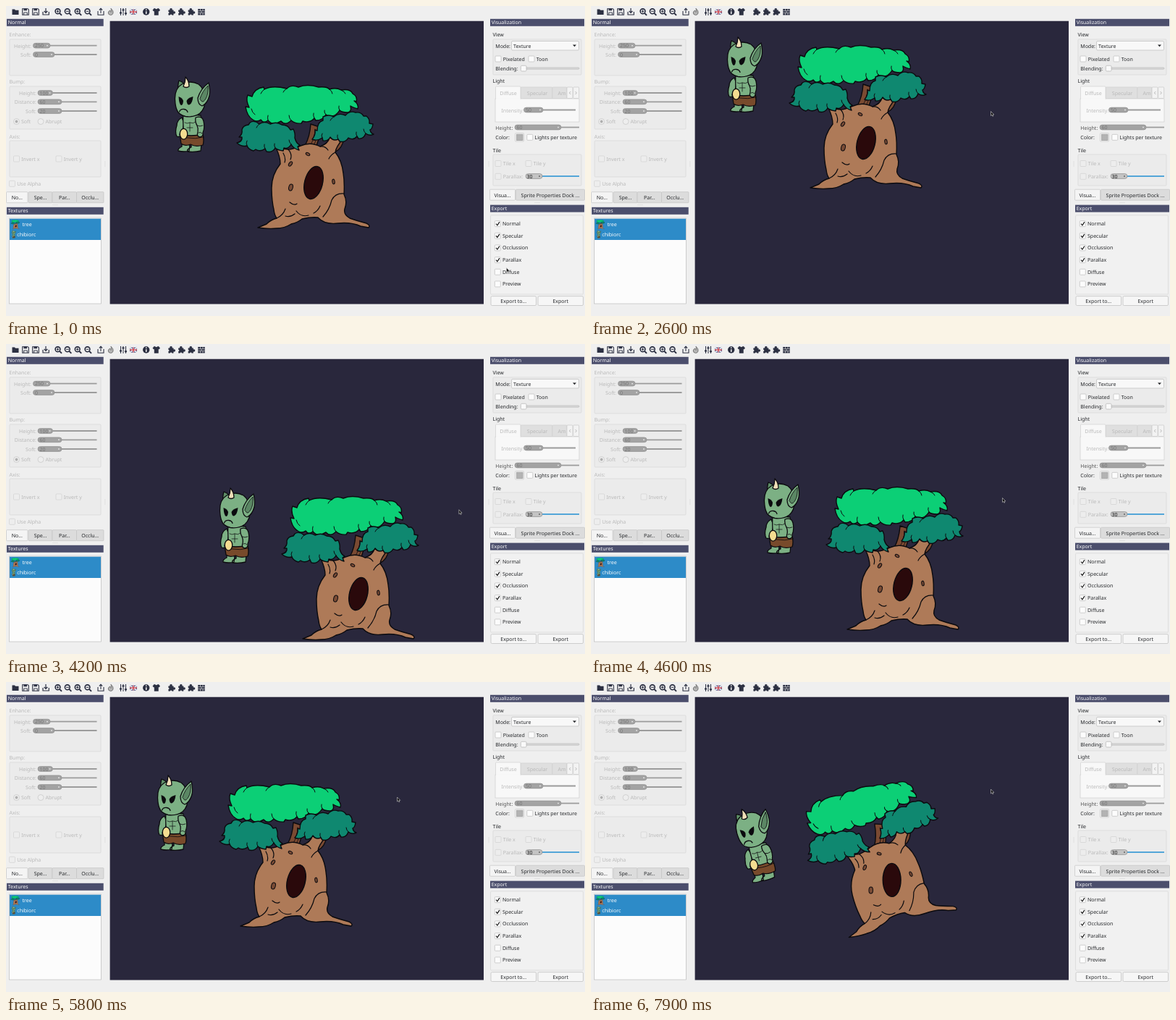
Write an HTML page that moves like this. It is 800 px wide and 428 px high and loops after 8 s.

```html
<!DOCTYPE html>
<html lang="en">
<head>
<meta charset="utf-8">
<title>Sprite lighting editor</title>
<style>
html, body { margin: 0; width: 100%; height: 100%; overflow: hidden; background: #efefef; }
svg { display: block; width: 100vw; height: 100vh; }
text { font: 7px "Noto Sans", sans-serif; text-rendering: geometricPrecision; white-space: pre; }
</style>
</head>
<body>
<svg id="stage" viewBox="0 0 800 428">
  <defs>
    <clipPath id="view"><rect x="143.6" y="20.7" width="516.4" height="390.7"/></clipPath>
    <g id="tree" stroke="#0b0a0e" stroke-width="1.4" stroke-linejoin="round" stroke-linecap="round">
      <path fill="#7a4a32" d="M421 163Q420 180 413 193L428 196Q433 182 436 168ZM449 194Q458 190 460 183L467 182Q465 197 454 202Z"/>
      <path fill="none" stroke-width=".8" d="M427 170Q427 182 420 193M432 172Q430 184 425 192"/>
      <path fill="#ae7a58" d="M373 196Q379 208 379 218Q367 233 367 251Q367 268 370 281Q371 289 374 293Q366 295 360 301L348 306Q363 308 373 307Q385 307 394 301Q403 299 409 294Q421 291 431 292Q440 302 458 300Q477 298 490 304L501 306Q504 303 498 300Q483 296 475 293Q466 288 468 280Q472 270 467 260Q468 243 466 231Q464 213 455 202Q456 194 466 183L447 182Q445 190 434 194Q421 187 407 193Q396 198 390 198Z"/>
      <path fill="none" stroke-width="1.2" d="M390 198Q396 205 393 212M383 203Q387 210 385 216M434 194Q441 193 445 199M455 202Q449 205 446 211M467 259Q455 258 450 268Q447 281 438 291M374 293Q383 289 386 280M386 290Q393 292 399 287M401 283Q408 292 418 289M392 271Q398 276 402 273M434 276Q431 283 425 286"/>
      <ellipse cx="425" cy="244" rx="12.4" ry="23" fill="#2a090b" transform="rotate(14 425 244)"/>
      <g fill="#794b35" stroke-width="1">
        <ellipse cx="393.5" cy="250.5" rx="2.8" ry="4.6" transform="rotate(15 393.5 250.5)"/>
        <ellipse cx="393" cy="218" rx="2" ry="3.6" transform="rotate(35 393 218)"/>
        <ellipse cx="417" cy="204.5" rx="3" ry="1.8" transform="rotate(30 417 204.5)"/>
        <ellipse cx="452.5" cy="242.5" rx="1.7" ry="3.4" transform="rotate(-8 452.5 242.5)"/>
      </g>
      <path fill="#0ccf76" d="M341 157Q333 152 331 139L336 140Q331 130 334 123L340 125Q343 114 356 112L357 115Q368 109 388 114Q394 108 404 112Q416 107 432 112Q444 111 447 115Q456 112 463 116Q476 114 479 121Q486 125 484 132L481 131Q488 136 486 142Q479 140 476 138Q478 146 472 147Q464 147 461 144Q456 152 449 152Q444 152 442 150Q438 158 428 158L426 155Q420 162 410 159L408 162Q400 163 394 158Q386 166 380 159L374 162Q367 164 362 158Q356 163 352 157Q347 161 341 157Z"/>
      <path fill="none" stroke-width="1" d="M344 150Q340 147 339 142M362 158Q361 154 362 151M394 158Q391 155 391 151M426 155Q424 151 425 148M442 150Q439 147 440 144M461 144Q459 141 460 138M357 115Q353 118 352 121M388 114Q384 116 383 119M447 115Q451 118 451 121M463 116Q468 118 469 121"/>
      <path fill="#0f8870" d="M319 189Q327 187 326 181L322 181Q327 177 326 171Q327 165 335 164L337 161Q343 157 350 163Q357 158 365 163Q374 159 381 164Q390 164 393 171L397 170Q400 176 399 182Q401 190 406 192L403 194L405 199Q397 197 394 191Q390 198 384 196L383 200Q375 199 372 196Q368 203 360 201L358 197Q351 202 345 198L342 200Q335 198 333 193Q326 195 319 189Z"/>
      <path fill="#0f8870" d="M423 184Q428 178 427 171L430 172Q430 160 438 158L438 153Q446 149 453 153Q460 147 469 151Q475 144 483 147Q491 146 494 152L498 152Q503 156 502 162L507 163Q506 170 503 171Q504 176 508 177Q502 180 497 176Q494 184 487 183L485 180Q480 186 473 182Q469 189 461 187L459 184Q452 187 448 181Q445 187 438 186L437 182Q430 187 423 184Z"/>
      <path fill="none" stroke-width="1" d="M333 193Q331 189 333 186M358 197Q356 194 357 191M372 196Q370 193 371 190M394 191Q391 188 391 185M350 163Q347 165 346 168M437 182Q435 179 437 176M459 184Q457 181 458 178M485 180Q483 177 484 174M497 176Q494 173 494 170M453 153Q449 155 448 158"/>
    </g>
    <g id="orc" stroke="#0b0a0e" stroke-width="1.3" stroke-linejoin="round" stroke-linecap="round">
      <path fill="#5f8f68" d="M238 118Q237 109 239 103Q245 105 248 110Z"/>
      <path fill="#7cb084" d="M243 189L243 194Q237 197 238 200Q246 202 253 200L254 192ZM256 191L256 195Q249 198 251 201Q261 202 269 200L270 190Z"/>
      <path fill="#7cb084" d="M243 154Q236 158 236 165Q233 174 236 180Q241 182 243 176L246 162Z"/>
      <path fill="#7cb084" d="M245 149Q244 163 246 179L269 180Q272 165 269 151Z"/>
      <path fill="none" stroke-width=".7" d="M247 161Q250 163 254 161Q259 163 262 160M254 161V173M250 168H258"/>
      <path fill="#784a2b" d="M240 177Q255 181 272 177Q274 186 272 192Q262 195 255 191Q247 194 242 190Z"/>
      <path fill="none" stroke-width=".8" d="M250 182Q262 184 273 181"/>
      <ellipse cx="245.5" cy="176.7" rx="5.2" ry="7.4" fill="#f4dc90"/>
      <path fill="#7cb084" d="M262 154Q271 151 273 159Q275 168 272 175Q273 180 268 181Q263 180 265 174Q266 169 264 165Q261 160 262 154Z"/>
      <path fill="none" stroke-width=".8" d="M264 165Q268 167 272 165M266 175Q268 173 271 176"/>
      <path fill="#7cb084" d="M233.5 129Q233 114 243 108Q255 102 266 108Q274 114 275 127Q276 141 268 148Q260 154 248 152.5Q238 150 236 143Q234 139 233.5 129Z"/>
      <path fill="#7cb084" d="M265 127Q269 114 280 106Q282.500 116 281 124Q278 135 271 138Q265 136 265 127Z"/>
      <path fill="#5b8764" stroke-width=".8" d="M268 128Q271 118 279 110Q280 121 276 128Q273 133 271 132Z"/>
      <path fill="#f0dfb8" d="M245 111Q248 105 248 98Q253 103 253 111Q249 114 245 111Z"/>
      <g fill="#0b0a0e" stroke="none">
        <path d="M238.500 125Q244 127 245 131Q244.500 137 242 137Q239 135.500 238.500 125Z"/>
        <path d="M258.500 125Q251 127 249.500 131Q250 136.500 253 136.500Q257.500 135 258.500 125Z"/>
      </g>
      <path fill="none" d="M239.500 146Q241 142 246 142.500Q250 143 251 146.500"/>
    </g>
  </defs>
  <g id="ui"></g>
  <g clip-path="url(#view)">
    <rect x="143" y="20" width="518" height="392" fill="#29273c"/>
    <g id="sprites"><use href="#orc"/><use href="#tree"/></g>
  </g>
  <path id="cursor" fill="#111" stroke="#cfcfcf" stroke-width=".6" d="M0 0V6L1.4 4.800L2.400 6.800L3.300 6.400L2.500 4.400H4.300Z"/>
</svg>
<script>
const $ = id => document.getElementById(id);
const INK = '#26282b', DIM = '#b9b9b9', ICON = '#2c3042';
const out = [];

const put = s => out.push(s);
const box = (x, y, x2, y2, fill, stroke = 'none', r = 0) =>
  put(`<rect x="${x}" y="${y}" width="${x2 - x}" height="${y2 - y}" rx="${r}" fill="${fill}" stroke="${stroke}" stroke-width=".7"/>`);
const path = (d, stroke, w = 1, fill = 'none') =>
  put(`<path d="${d}" fill="${fill}" stroke="${stroke}" stroke-width="${w}"/>`);
const dot = (x, y, r, fill, stroke = 'none', w = .7) =>
  put(`<circle cx="${x}" cy="${y}" r="${r}" fill="${fill}" stroke="${stroke}" stroke-width="${w}"/>`);
// y is the middle of the capital letters
const text = (x, y, s, fill = INK, anchor = 'start') =>
  put(`<text x="${x}" y="${y + 2.5}" fill="${fill}" text-anchor="${anchor}">${s}</text>`);
const header = (x, x2, y, s) => {
  box(x, y, x2, y + 10, '#4b4e6c');
  text(x + 1.7, y + 4.9, s, '#fafafa');
};
const frame = (x, y, x2, y2, fill = '#ebebeb') => box(x, y, x2, y2, fill, '#d6d6d6', 1);
const check = (x, y, s, on = false, off = false) => {
  box(x, y - 4, x + 8, y + 4, off ? '#ededed' : '#fcfcfc', off ? '#d2d2d2' : '#bdbdbd', 1);
  if (on) path(`M${x + 1.8} ${y}l1.8 2.2l3-4.6`, '#1c1c1c', 1.2);
  text(x + 10.7, y, s, off ? DIM : INK);
};
const slider = (y, x, x2, end, s) => {
  path(`M${x2} ${y}H${end}`, '#9c9c9c', 1.8);
  box(x, y - 3.4, x2, y + 3.4, '#a3a3a3', '#8e8e8e', 3.4);
  text(x + 2.5, y, s, '#777');
  path(`M${x2 - 5} ${y}h2`, '#dedede', 1.5);
};
const tab = (x, x2, y, s, on) => {
  box(x, y, x2, y + 15, on ? '#f4f4f4' : '#dcdcdc', '#c4c4c4', 1);
  text((x + x2) / 2, y + 8, s, INK, 'middle');
};
const button = (x, x2, s) => {
  box(x, 400.7, x2, 413.5, '#f6f6f6', '#bdbdbd', 1.5);
  text((x + x2) / 2, 407, s, INK, 'middle');
};

function toolbar() {
  path('M8.5 12V4.5H12L13 5.7H17.5V12Z', 'none', 0, ICON);
  for (const x of [27, 41]) {
    path(`M${x - 4.3} 3.7H${x + 3}L${x + 4.3} 5V12.3H${x - 4.3}Z`, ICON, 1.1);
    box(x - 2.5, 3.7, x + 2, 6.3, ICON);
    path(`M${x - 2.3} 12V9H${x + 2.3}V12`, ICON, .9);
  }
  path('M51 8V12H59.3V8M55 3V9M52.7 7L55 9.3L57.4 7', ICON, 1.2);
  ['M69.5 7.3H73.5M71.5 5.3V9.3', 'M83 7.3H87', 'M96.7 7.3H100.7M98.7 5.3V9.3', 'M110.5 7.3H114.5'].forEach((d, i) => {
    const x = [71.5, 84.8, 98.7, 112.5][i];
    dot(x, 7.3, 3.4, 'none', ICON, 1.6);
    path(`M${x + 2.5} 9.8l3 3`, ICON, 1.9);
    path(d, ICON, 1);
  });
  path('M127 7V12.3H135V7M131 10V3.5M128.8 5.6L131 3.3L133.2 5.6', ICON, 1.1);
  path('M145 3.3Q149 7 148 10Q147 12.6 144.5 12.5Q141 12 141.2 9Q142 6.5 144 6Q143.8 8 145 8.5Q146 6 145 3.3Z', '#777', 1, '#b5b5b5');
  path('M158.5 3V13M162 3V13M165.5 3V13', ICON, 1);
  path('M157 9.5h3M160.5 5.5h3M164 10.3h3', ICON, 2);
  box(171, 4.8, 181, 11.6, '#34427f');
  path('M171 5L181 11.5M181 5L171 11.5M176 4.8V11.6M171 8.2H181', '#f3f3f3', 1.6);
  path('M176 4.8V11.6M171 8.2H181', '#c8323f', 1.2);
  dot(193.7, 8, 4.7, ICON);
  path('M193.7 7.2V11M193.7 4.6V6', '#fff', 1.4);
  path('M204.5 3.3H206Q207.7 5 209.5 3.3H211L213 5.7L211.3 7.4L210.7 7V12.7H204.8V7L204.2 7.4L202.5 5.7Z', 'none', 0, ICON);
  for (const x of [228.7, 242.5, 256]) {
    box(x - 4.3, 5.5, x + 2.8, 12.6, ICON);
    dot(x - .7, 4.8, 1.8, ICON);
    dot(x + 3.6, 9, 1.7, ICON);
    dot(x - 4.3, 9, 1.1, '#efefef');
    dot(x - .7, 12.6, 1.1, '#efefef');
  }
  box(265.3, 4, 274.7, 12.5, ICON);
  path('M265.3 6.8H274.7M265.3 9.6H274.7M268.5 4V6.8M272 4V6.8M270 6.8V9.6M268.5 9.6V12.5M272 9.6V12.5', '#efefef', .6);
}

function leftDock() {
  header(1, 134.7, 17.8, 'Normal');
  text(4.5, 39, 'Enhance:', DIM);
  frame(5, 46, 131, 96);
  text(35, 55, 'Height:', DIM, 'end');
  slider(54.7, 37.5, 61, 125.5, '250');
  text(35, 67.5, 'Soft:', DIM, 'end');
  slider(67, 37.5, 67, 125.5, '0');
  text(4.5, 104.3, 'Bump:', DIM);
  frame(5, 111, 131, 170);
  [['Height:', 120, 64.5, '100'], ['Distance:', 132.3, 77, '60'], ['Soft:', 145, 77, '20']].forEach(([s, y, x, n]) => {
    text(42, y + .4, s, DIM, 'end');
    slider(y, 44, x, 125.5, n);
  });
  [[14.5, 'Soft', 1], [48, 'Abrupt', 0]].forEach(([x, s, on]) => {
    dot(x, 159.5, 4, '#eee', '#c6c6c6');
    if (on) dot(x, 159.5, 1.9, '#b0b0b0');
    text(x + 6.5, 159.5, s, DIM);
  });
  text(4.5, 180, 'Axis:', DIM);
  frame(5, 186, 131, 236);
  check(10.5, 211, 'Invert x', false, true);
  check(69, 211, 'Invert y', false, true);
  check(4.5, 245.3, 'Use Alpha', false, true);
  tab(31, 64, 256.7, 'Spe...');
  tab(64, 97.5, 256.7, 'Par...');
  tab(97.5, 135, 256.7, 'Occlu...');
  tab(.5, 30, 256.7, 'No...', true);
  header(1, 134.7, 277.8, 'Textures');
  box(4.5, 293, 131.5, 411, '#fcfcfc', '#bcbcbc');
  box(5, 293.7, 131, 323, '#2d8bc8');
  put('<use href="#tree" transform="translate(-13.5 288.3) scale(.064)"/>');
  put('<use href="#orc" transform="translate(-17 299) scale(.108)"/>');
  text(22.5, 301, 'tree', '#fcfcfc');
  text(15.3, 315.7, 'chibiorc', '#fcfcfc');
}

function rightDock() {
  header(669, 799, 17.8, 'Visualization');
  text(672.5, 39, 'View');
  frame(673, 46, 795, 95);
  text(697, 55, 'Mode:', INK, 'end');
  box(698.5, 48.5, 791.5, 61, '#f8f8f8', '#bcbcbc', 1.5);
  text(701, 55, 'Texture');
  path('M783 53.4H788L785.5 56.2Z', 'none', 0, INK);
  check(676, 73, 'Pixelated');
  check(722, 73, 'Toon');
  text(676.3, 86.5, 'Blending:');
  box(712, 85, 792, 87.2, '#d8d8d8', '#bcbcbc', 1);
  box(711.3, 82.3, 719, 90, '#fafafa', '#b4b4b4', 1.5);

  text(672.5, 103, 'Light');
  box(711, 112, 755, 128, '#dfdfdf', '#d0d0d0', 1);
  box(755, 112, 775, 128, '#dfdfdf', '#d0d0d0', 1);
  box(676, 128, 792, 160, '#f8f8f8', '#cfcfcf');
  box(676.5, 111, 711, 129, '#f8f8f8', '#d0d0d0', 1);
  box(677, 127.5, 710.7, 130, '#f8f8f8');
  text(694, 120.3, 'Diffuse', DIM, 'middle');
  text(734, 120.3, 'Specular', DIM, 'middle');
  text(762.5, 120.3, 'Am', DIM);
  box(775, 112, 783, 127.5, '#f3f3f3', '#c8c8c8', 1);
  box(783.7, 112, 791.7, 127.5, '#f3f3f3', '#c8c8c8', 1);
  path('M780.3 118l-2 2l2 2M786.5 118l2 2l-2 2', '#aaa', .8);
  text(684.5, 144, 'Intensity:', DIM);
  slider(143.5, 715.5, 742, 787, '50');
  text(676.3, 168, 'Height:', '#555');
  slider(167.5, 703, 767, 792, '60');
  text(676.3, 181.3, 'Color:');
  box(703.5, 175.5, 715.5, 187, '#f3f3f3', '#c8c8c8', 1);
  box(705.5, 177.2, 714, 185.5, '#b3b3b3', '#9c9c9c');
  check(719.8, 181.3, 'Lights per texture');

  text(672.5, 199, 'Tile');
  frame(673, 205, 795, 248);
  check(676, 217.5, 'Tile x', false, true);
  check(718, 217.5, 'Tile y', false, true);
  check(676, 235.3, 'Parallax:', false, true);
  path('M740 235H792', '#54a6d8', 1.8);
  box(718, 231.6, 741, 238.4, '#c4c4c4', '#8e8e8e', 3.4);
  text(719.5, 235.2, '30', '#1b1b1b');
  path('M736 235h2', '#666', 1.5);

  tab(704.5, 799.5, 253.2, 'Sprite Properties Dock ...');
  tab(668.5, 703.5, 253.2, 'Visua...', true);
  header(669, 799, 274.6, 'Export');
  frame(669.5, 289, 797.5, 398, '#f1f1f1');
  ['Normal', 'Specular', 'Occlussion', 'Parallax', 'Diffuse', 'Preview'].forEach((s, i) =>
    check(675.3, 300.6 + i * 16.65, s, i < 4));
  button(670, 732.5, 'Export to...');
  button(735, 797.5, 'Export');
}

toolbar();
leftDock();
rightDock();
path('M136.8 214V222M667 214V222M64 274.7H72M730 271.6H738', '#dcdcdc', .8);
$('ui').innerHTML = out.join('');

// rows are [ms, x, y]
const drag = [
  [1700, 0, 0], [1850, 65, -28], [2000, 130, -10], [2200, 85, 54], [2400, -45, 15],
  [2600, -45, -55], [2800, 52, -42], [2950, 98, -12], [3100, 75, 13], [3300, 42, -11],
  [3500, 5, 0], [3700, -20, 35], [3950, 5, 85], [4200, 62, 101], [4400, 60, 102],
  [4600, 6, 88], [4900, -32, 55], [5200, -24, 34], [5800, -24, 31], [8000, -24, 31]
];
// pointer position relative to the dragged sprites
const hand = [
  [0, 98, 161], [100, 62, 98], [200, 16, 26], [300, 0, 0], [600, 0, 0], [800, 28, 28],
  [900, 38, 44], [1100, 0, -1], [1200, 0, -1], [1300, 0, 0], [1700, 0, 0], [2600, 4, 0],
  [3300, 0, 0], [3500, 0, 0], [4300, -31, -76], [4600, -31, -76], [5200, -29, -72.5],
  [5900, -29, -72.5], [6300, -14, -45], [6800, -.5, -5.5], [7000, -.5, -5.5],
  [7400, 4, -45], [7900, -17, -83.5], [8000, -17, -83.5]
];

const still = (a, b) => a[1] === b[1] && a[2] === b[2];
function slope(k, i, c) {
  const a = k[i - 1], p = k[i], b = k[i + 1];
  return !a || !b || still(a, p) || still(p, b) ? 0 : (b[c] - a[c]) / (b[0] - a[0]);
}
function at(k, t) {
  if (t <= k[0][0]) return k[0].slice(1);
  const i = k.findIndex(p => p[0] >= t) - 1;
  const a = k[i], b = k[i + 1], d = b[0] - a[0], u = (t - a[0]) / d, v = 1 - u;
  return [1, 2].map(c =>
    a[c] * v * v * (1 + 2 * u) + b[c] * u * u * (3 - 2 * u) +
    d * u * v * (slope(k, i, c) * v - slope(k, i + 1, c) * u));
}

function draw(ms) {
  const t = Math.floor(ms % 8000 / 100) * 100;
  const [x, y] = at(drag, t), [hx, hy] = at(hand, t);
  const turn = -14.3 * Math.min(1, Math.max(0, (t - 7000) / 900));
  $('sprites').setAttribute('transform', `rotate(${turn} 402 215.7) translate(${x} ${y})`);
  $('cursor').setAttribute('transform', `translate(${593.5 + x + hx} ${200.5 + y + hy})`);
}

let start;
function tick(now) {
  start ??= now;
  draw(now - start);
  requestAnimationFrame(tick);
}
draw(0);
requestAnimationFrame(tick);
</script>
</body>
</html>
```
